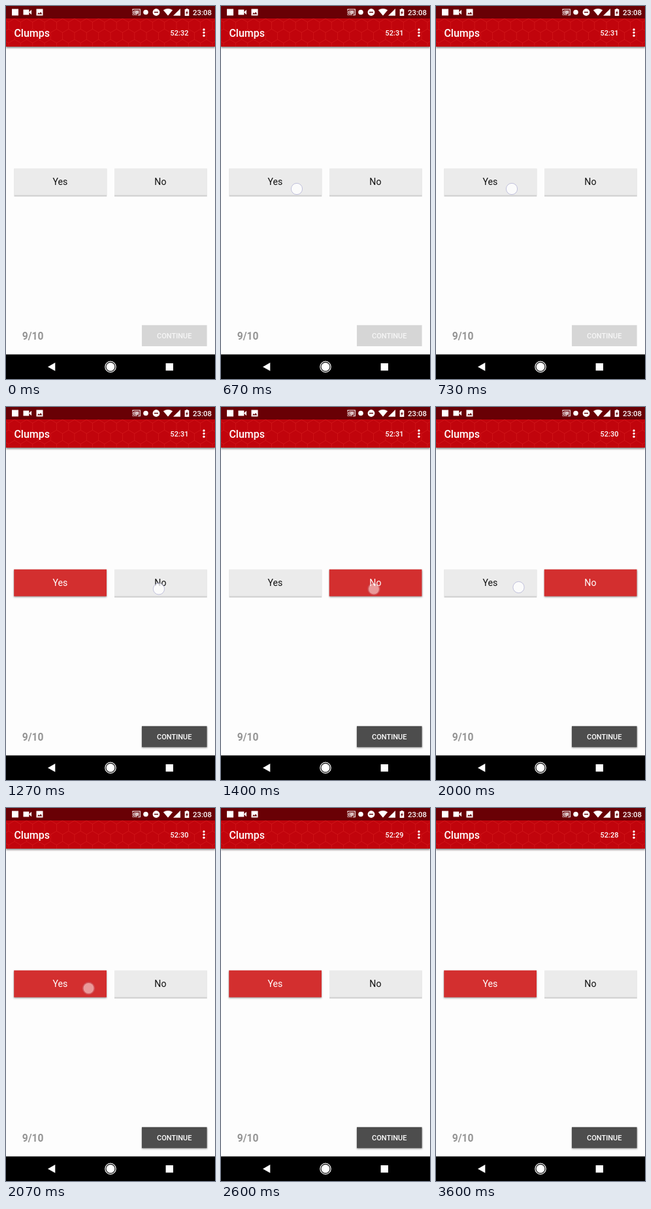
These frames come from a looping animation (320 px wide and 569 px high, 3670 ms). An HTML page with a canvas:

```html
<!DOCTYPE html>
<html lang="en">
<head>
<meta charset="utf-8">
<title>Quiz screen</title>
<style>
  html, body { margin: 0; width: 100%; height: 100%; overflow: hidden; background: #fdfdfd; }
  canvas { display: block; width: 320px; height: 569px; }
</style>
</head>
<body>
<canvas id="stage"></canvas>
<script>
const W = 320, H = 569, LOOP = 3670, TICK = 1000 / 15;
const canvas = document.getElementById('stage');
const ratio = window.devicePixelRatio || 1;
canvas.width = Math.round(W * ratio);
canvas.height = Math.round(H * ratio);
const ctx = canvas.getContext('2d');
ctx.scale(ratio, ratio);

// Each tap: finger down, choice made, finger trace gone (in ticks)
const taps = [
  { x: 116, y: 279, down: 10, pick: 11, end: 14, choice: 'Yes' },
  { x: 234, y: 277.5, down: 19, pick: 21, end: 24, choice: 'No' },
  { x: 126.5, y: 275, down: 29, pick: 31, end: 33, choice: 'Yes' }
];
const clockTicks = [10, 24, 39, 54];

function rect(x, y, w, h, color) {
  ctx.fillStyle = color;
  ctx.fillRect(x, y, w, h);
}

function poly(color, ...points) {
  ctx.beginPath();
  for (const [x, y] of points) ctx.lineTo(x, y);
  ctx.closePath();
  ctx.fillStyle = color;
  ctx.fill();
}

function circle(x, y, r, fill, stroke, width = 1) {
  ctx.beginPath();
  ctx.arc(x, y, r, 0, Math.PI * 2);
  if (fill) { ctx.fillStyle = fill; ctx.fill(); }
  if (stroke) { ctx.strokeStyle = stroke; ctx.lineWidth = width; ctx.stroke(); }
}

function text(str, x, y, size, color, weight = 400, align = 'left') {
  ctx.font = `${weight} ${size}px Roboto, sans-serif`;
  ctx.textAlign = align;
  ctx.fillStyle = color;
  ctx.fillText(str, x, y);
}

function shadowRect(x, y, w, h, color, alpha) {
  ctx.save();
  ctx.shadowColor = `rgba(0,0,0,${alpha})`;
  ctx.shadowBlur = 2.5 * ratio;
  ctx.shadowOffsetY = 1.5 * ratio;
  rect(x, y, w, h, color);
  ctx.restore();
}

function honeycomb() {
  const side = 10.6, stepX = side * Math.sqrt(3), stepY = side * 1.5;
  ctx.save();
  ctx.beginPath();
  ctx.rect(0, 19, W, 43);
  ctx.clip();
  ctx.beginPath();
  for (let row = 0; row < 5; row++) {
    for (let col = -1; col < 19; col++) {
      const x = (col + (row % 2) / 2) * stepX + 4, y = 14 + row * stepY;
      for (let i = 0; i < 4; i++) {
        const a = Math.PI * (i / 3 - 0.5);
        const px = x + side * Math.cos(a), py = y + side * Math.sin(a);
        i ? ctx.lineTo(px, py) : ctx.moveTo(px, py);
      }
    }
  }
  ctx.strokeStyle = 'rgba(255,80,70,0.22)';
  ctx.lineWidth = 1;
  ctx.stroke();
  ctx.restore();
}

function statusIcons() {
  const ink = '#fff', back = '#690005';
  rect(9, 4.5, 10, 10, ink);

  rect(26.5, 5.5, 8.8, 8, ink);
  poly(ink, [35, 9.5], [39, 5.8], [39, 13.2]);

  rect(46.5, 4.5, 10, 10, ink);
  poly(back, [48, 12.6], [50, 10], [51.4, 11.6], [53.2, 9], [55.3, 12.6]);

  // Screen casting
  ctx.strokeStyle = ink;
  ctx.lineWidth = 1.1;
  ctx.beginPath();
  ctx.moveTo(194, 7);
  ctx.lineTo(194, 5);
  ctx.lineTo(205.3, 5);
  ctx.lineTo(205.3, 13.8);
  ctx.lineTo(201.5, 13.8);
  ctx.stroke();
  rect(196, 6.8, 7.5, 5.2, 'rgba(255,255,255,0.75)');
  poly(back, [193, 7.4], [197.5, 8], [200.8, 14.5], [193, 14.5]);
  for (const r of [1.5, 3.8, 6]) {
    ctx.beginPath();
    ctx.arc(193.5, 14.2, r, -Math.PI / 2, 0);
    ctx.stroke();
  }

  circle(214, 9.5, 3.8, ink);

  circle(230, 9.5, 5.4, ink);
  rect(227, 8.8, 6, 1.5, back);

  // Wi-Fi, signal, battery
  ctx.beginPath();
  ctx.moveTo(248, 14.8);
  ctx.lineTo(240.8, 6.2);
  ctx.quadraticCurveTo(248, 1.8, 255.2, 6.2);
  ctx.closePath();
  ctx.fillStyle = ink;
  ctx.fill();
  poly(ink, [256, 14.8], [267, 14.8], [267, 4]);
  rect(275.5, 4, 3, 1.5, ink);
  rect(273.7, 5, 6.6, 10, ink);
  poly(back, [277.7, 6.7], [275, 10.7], [276.6, 10.7], [276.3, 13.6], [279, 9.5], [277.4, 9.5]);
}

function choiceButton(label, x, selected) {
  if (selected) {
    shadowRect(x - 0.3, 247.7, 141.8, 41, '#d32f2f', 0.4);
  } else {
    rect(x, 248, 141.8, 42.6, '#cfcfcf');
    rect(x, 247.7, 141.8, 40.8, '#ebebeb');
  }
  text(label, x + 70.4, 273.4, 14.2, selected ? '#fff' : '#111', 400, 'center');
}

function drawTouch(tap, tick) {
  if (tick < tap.down || tick >= tap.end) return;
  const held = tick < tap.pick;
  ctx.save();
  ctx.globalAlpha = held ? 1 : (tap.end - tick) / (tap.end - tap.pick);
  if (held) {
    circle(tap.x, tap.y, 8.6, 'rgba(255,255,255,0.8)', 'rgba(176,176,212,0.75)', 1);
  } else {
    circle(tap.x, tap.y, 9.2, 'rgba(255,255,255,0.12)', 'rgba(190,120,140,0.45)', 1);
    circle(tap.x, tap.y, 8, 'rgba(255,255,255,0.45)');
  }
  ctx.restore();
}

function navBar() {
  rect(0, 531.5, W, H - 531.5, '#000');
  poly('#fff', [64, 550.4], [75.3, 544], [75.3, 556.8]);
  circle(160, 550.4, 8.2, null, '#fff', 1.2);
  circle(160, 550.4, 6.4, '#fff');
  rect(244.6, 545, 11.4, 11.2, '#fff');
}

function draw(time) {
  const tick = Math.floor((time % LOOP) / TICK + 0.001);
  const choice = taps.filter(tap => tick >= tap.pick).at(-1)?.choice;
  const seconds = 32 - clockTicks.filter(t => tick >= t).length;

  rect(0, 0, W, H, '#fdfdfd');
  shadowRect(0, 19, W, 43, '#c1040c', 0.45);
  honeycomb();
  rect(0, 0, W, 19, '#690005');
  statusIcons();
  text('23:08', 286, 13.6, 11.4, '#fff', 500);
  text('Clumps', 12.4, 46.5, 16, '#fff', 500);
  text(`52:${seconds}`, 251.6, 44.8, 11, '#fff', 500);
  for (const y of [36, 40.6, 45.2]) circle(303, y, 1.7, '#fff');

  choiceButton('Yes', 12.5, choice === 'Yes');
  choiceButton('No', 166, choice === 'No');

  text('9/10', 24.7, 509, 15.6, '#949494', 700);
  if (choice) shadowRect(208, 486.8, 99.6, 32, '#4d4d4d', 0.4);
  else rect(208, 486.8, 99.6, 32.2, '#d6d6d6');
  text('CONTINUE', 257.8, 507, 11, choice ? '#fff' : '#f6f6f6', 500, 'center');

  navBar();
  for (const tap of taps) drawTouch(tap, tick);
}

const start = performance.now();
function frame() {
  draw(performance.now() - start);
  requestAnimationFrame(frame);
}
frame();
</script>
</body>
</html>
```
